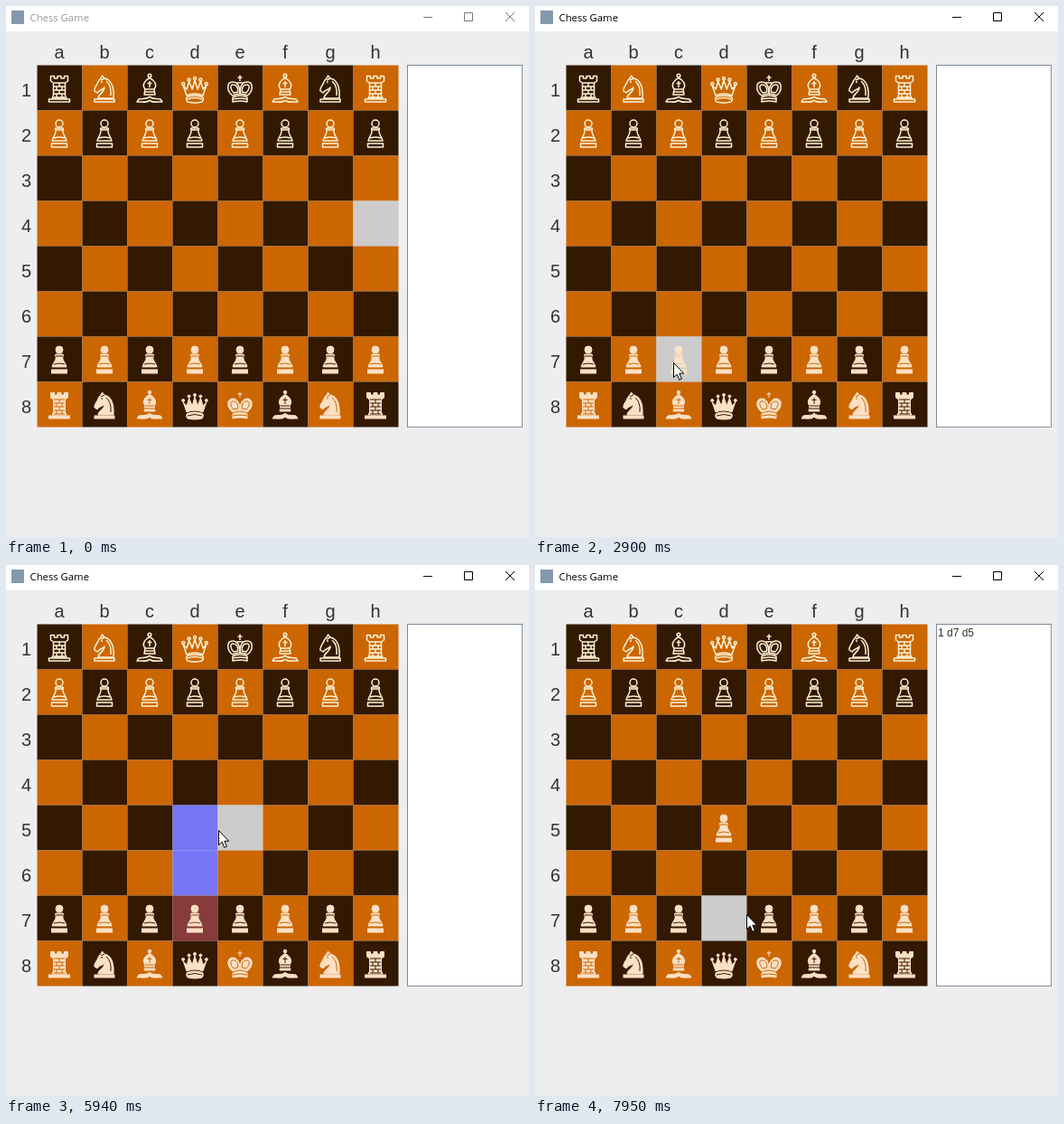
An HTML page for the animation above (8 s loop, 579 px wide and 587 px high).

```html
<!DOCTYPE html>
<html lang="en">
<head>
<meta charset="utf-8">
<title>Chess Game</title>
<style>
  html, body { margin: 0; width: 100%; height: 100%; overflow: hidden; background: #eee; }
  svg { display: block; width: 579px; height: 587px; }
  .axis { font: 20px "Liberation Sans", Arial, sans-serif; fill: #333; text-anchor: middle; }
  .log { font: 12px "Liberation Sans", Arial, sans-serif; fill: #333; }
  .title { font: 11.3px "Open Sans", sans-serif; fill: #999; }
  .buttons { fill: none; stroke: #777; }
  .active .title { fill: #000; }
  .active .buttons { stroke: #000; }
  .piece { stroke-width: 1.5; stroke-linejoin: round; }
  .outline { fill: none; stroke: #fff3d6; }
  .solid { fill: #ffe0c4; }
  .mask { fill: #fff; stroke: #fff; }
  .cut { fill: none; stroke: #000; }
</style>
</head>
<body>
<svg viewBox="0 0 579 587">
  <defs id="shapes"></defs>
  <g id="bar">
    <rect width="579" height="28" fill="#fff"/>
    <rect x="6" y="5" width="14" height="15" fill="#8499ae"/>
    <text class="title" x="26.500" y="17">Chess Game</text>
    <path class="buttons" d="M462 12.5h10M507.5 7.5h9v9h-9zM553 7l10 10M563 7l-10 10"/>
  </g>
  <rect x="444.5" y="65.5" width="127" height="400" fill="#fff" stroke="#7a8a99"/>
  <path d="M445 466.5h127.500V66" fill="none" stroke="#fff"/>
  <g id="board"></g>
  <text id="log" class="log" x="446" y="79">1 d7 d5</text>
  <path id="cursor" fill="#fff" stroke="#000" stroke-linejoin="round"
    d="M.5 .5V16.6L4.2 13.2 6.7 19.3 9.4 18.2 6.9 12.2H11.6Z"/>
</svg>
<script>
const LOOP = 8000, STEP = 76, CELL = 50, LEFT = 34, TOP = 65;
const ENTER = 370, FOCUS = 1210, FIRST_HOVER = 31;
const DARK = '#331900', LIGHT = '#cc6600', HOVER = '#ccc', PICKED = '#873b3b', TARGET = '#7676f6';
const $ = id => document.getElementById(id);

// Piece shapes, centred on the origin
const path = d => `<path d="${d}"/>`;
const both = d => path(d) + `<path transform="scale(-1 1)" d="${d}"/>`;
const ball = (x, y, r) => `<circle cx="${x}" cy="${y}" r="${r}"/>`;
const foot = (w, y) => `<rect x="${-w}" y="${y}" width="${2 * w}" height="${16 - y}"/>`;

function bricks() {
  let d = '';
  for (let row = 0; row < 4; row++) {
    const y = 4 * row - 5;
    d += `M-6 ${y}H6`;
    for (let x = row % 2 ? -3 : 0; x < 6; x += 6) d += `M${x} ${y}v4`;
  }
  return path(d + 'M-6 11H6');
}

function crown() {
  let d = 'M-9 9', balls = '';
  for (let i = -2; i <= 2; i++) {
    const x = 6.4 * i, y = 1.5 * i * i - 10;
    balls += ball(x, y, 1.5);
    d += `L${x} ${y + 2}`;
    if (i < 2) d += `L${x + 3.2 - i * .4} 2`;
  }
  return balls + path(d + 'L9 9Q0 5-9 9');
}

const shapes = {
  r: { body: both('M0-12.5H-2V-10H-5.500V-12.500H-9.500V-7L-6.500-5V9L-8 12H0') + foot(11.5, 13), lines: bricks() },
  n: {
    body: path('M-2.5-13L0-10C7-9 11-1 10 12H-7C-7 7 0 6 0 0-2 3-5 2-8 6L-11 4C-12 1-8-3-7-6-6-9-4-9-2.5-13Z') + foot(11, 13),
    lines: path('M-4-6h2M0-10L-4-8M2-7Q8-2 7 9')
  },
  b: {
    body: ball(0, -13, 1.8) + both('M0-10.500C-5-8-9-3-5 2L-6 8H0') +
      both('M0 10C-2 13-6 12-12 13L-14 16C-6 16-2 17 0 14'),
    lines: path('M0-7V0M-2.5-4.500H2.500M-5 2H5M-6 5H6')
  },
  q: { body: crown() + both('M0 9Q-6 9-9 11-10 14-8 16-4 17 0 17'), lines: path('M-8 13Q0 10 8 13') },
  k: {
    body: path('M0-13.500V-7M-2.500-11H2.500') + both('M0 7C0-3-4-6-8-6-15-6-15 4-8 9Q-4 7 0 7') +
      both('M0 9Q-5 9-8 11V16Q-4 15 0 15'),
    lines: both('M-2.300 5C-2-1-4-3-8-3-11-3-11 2-7 6ZM0-5Q-3-6-4-4') + path('M-8 13Q0 11 8 13')
  },
  p: {
    body: ball(0, -10, 4) + both('M0-5H-4Q-5-4-4-3C-3 2-7 4-8 9H0') + foot(8.5, 12),
    lines: path('M-4-3H4M-6 6Q0 4 6 6')
  }
};

// Solid pieces cut their inner lines out, so the square shows through
for (const kind in shapes) {
  const { body, lines } = shapes[kind];
  $('shapes').innerHTML += `<g id="${kind}">${body}${lines}</g>
    <mask id="cut-${kind}"><g class="mask">${body}</g><g class="cut">${lines}</g></mask>`;
}

const centre = i => [LEFT + CELL * (i % 8 + .5), TOP + CELL * ((i >> 3) + .5)];
const place = (el, [x, y]) => el.setAttribute('transform', `translate(${x} ${y})`);

function buildBoard() {
  let html = '';
  for (let i = 0; i < 64; i++) {
    const [x, y] = centre(i);
    html += `<rect class="cell" x="${x - 24.5}" y="${y - 24.5}" width="${CELL}" height="${CELL}"/>`;
  }
  for (let i = 0; i < 8; i++) {
    html += `<text class="axis" x="${59 + i * CELL}" y="58">${'abcdefgh'[i]}</text>
      <text class="axis" x="22.5" y="${100 + i * CELL}">${i + 1}</text>`;
  }
  const kinds = 'rnbqkbnr' + 'p'.repeat(8) + ' '.repeat(32) + 'p'.repeat(8) + 'rnbqkbnr';
  [...kinds].forEach((kind, i) => {
    if (kind === ' ') return;
    const shape = i < 16 ? `<use href="#${kind}" class="outline"/>`
      : `<rect class="solid" x="-25" y="-25" width="50" height="50" mask="url(#cut-${kind})"/>`;
    html += `<g class="piece" id="at-${i}" transform="translate(${centre(i)})">${shape}</g>`;
  });
  $('board').innerHTML = html;
}
buildBoard();
const cells = [...document.querySelectorAll('.cell')];

// Cursor moves: start, end, x, y
const moves = [
  [370, 980, 66, 400], [1210, 1290, 70, 391], [1690, 1990, 108, 318], [2065, 2290, 108, 396],
  [2520, 2900, 153, 394], [3710, 4090, 127, 389], [4620, 4930, 207, 395], [5400, 5480, 210, 300],
  [5630, 5940, 235, 293], [6020, 6170, 222, 294], [6250, 6400, 262, 402], [6480, 6860, 258, 397],
  [7260, 7490, 252, 440], [7570, 7950, 234, 386]
];
const clicks = [1290, 2520, 3300, 4010, 4320, 4775, 5100, 6170, 6780, 7490];

// The pointer advances in discrete steps
function cursorAt(t) {
  let x = 150, y = 590;
  for (const [start, end, toX, toY] of moves) {
    if (t < start) break;
    const last = Math.round((end - start) / STEP);
    const step = Math.floor((t - start) / (end - start) * last + 1e-6);
    const u = Math.min(1, (step + 1) / (last + 1));
    x = Math.round(x + (toX - x) * u);
    y = Math.round(y + (toY - y) * u);
  }
  return [x, y];
}

function cellAt([x, y]) {
  const col = Math.floor((x - LEFT - 1) / CELL), row = Math.floor((y - TOP - 1) / CELL);
  return row < 8 ? row * 8 + col : -1;
}

const isTarget = (i, pawn) => pawn >= 0 && (i === pawn - 8 || i === pawn - 16);

// A click picks a pawn; the next one moves it or lets it go
function playTo(t) {
  let picked = -1, move = null;
  for (const time of clicks.filter(c => c <= t)) {
    const cell = cellAt(cursorAt(time));
    if (isTarget(cell, picked)) move = { from: picked, to: cell };
    picked = picked < 0 ? cell : -1;
  }
  return { picked, move };
}

let shifted = null;
function draw(t) {
  const pos = cursorAt(t), { picked, move } = playTo(t);
  const hover = t < ENTER ? FIRST_HOVER : cellAt(pos);
  cells.forEach((cell, i) => {
    const base = ((i >> 3) + i) % 2 ? LIGHT : DARK;
    cell.setAttribute('fill', i === picked ? PICKED : i === hover ? HOVER : isTarget(i, picked) ? TARGET : base);
  });
  if (shifted) place($('at-' + shifted.from), centre(shifted.from));
  if (move) place($('at-' + move.from), centre(move.to));
  shifted = move;
  place($('cursor'), pos);
  $('log').style.display = move ? '' : 'none';
  $('bar').classList.toggle('active', t >= FOCUS);
}

function tick() {
  draw(performance.now() % LOOP);
  requestAnimationFrame(tick);
}
tick();
</script>
</body>
</html>
```
